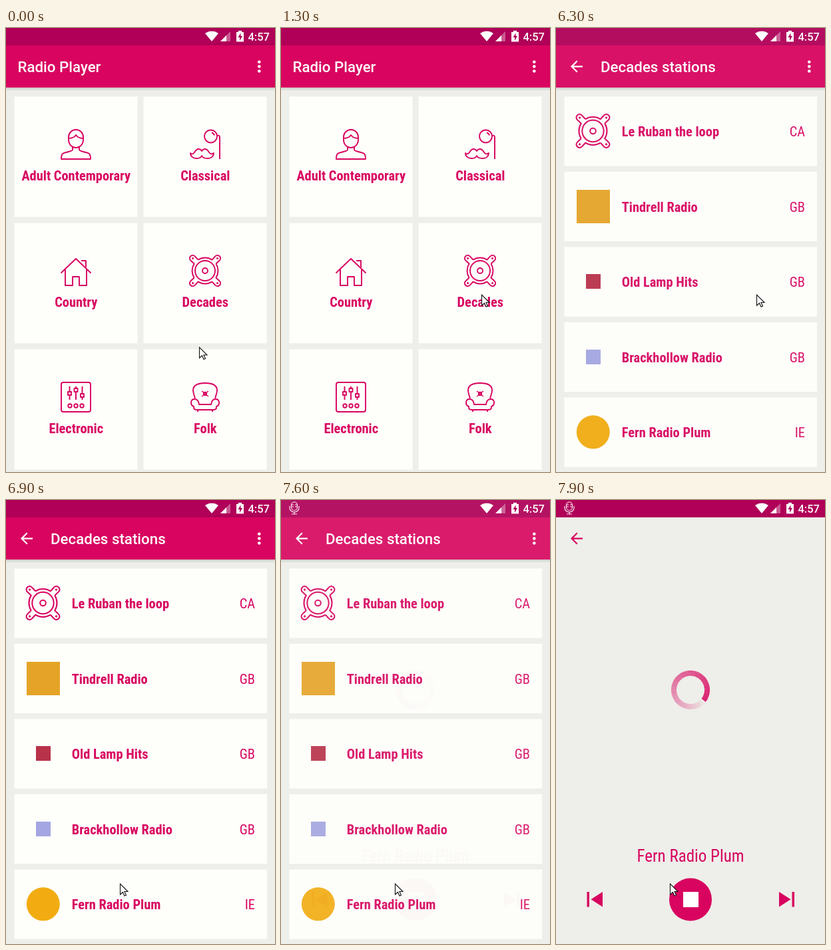
Recreate the animation shown at these times as an HTML page. Size 404x664 px, loop 8000 ms.

```html
<!DOCTYPE html>
<html lang="en">
<head>
<meta charset="utf-8">
<title>Radio Player</title>
<style>
  html, body { margin: 0; width: 100%; height: 100%; overflow: hidden; background: #eeeeea; }
  svg { display: block; width: 404px; height: 664px; font-family: "Roboto Condensed", Roboto, sans-serif; font-stretch: 75%; }
  .card { fill: #fefefb; }
  .line { fill: none; stroke: #d8045f; stroke-width: 1.9; stroke-linejoin: round; }
  .label { font-size: 20.4px; font-weight: 700; fill: #d8045f; }
  .code { font-size: 20.4px; font-weight: 400; fill: #d8045f; }
  .station { font-size: 25px; fill: #d8045f; }
  .title { font-family: Roboto, sans-serif; font-stretch: 100%; font-size: 22.3px; font-weight: 500; fill: #fff; }
  .clock { font-family: Roboto, sans-serif; font-stretch: 100%; font-size: 16.5px; font-weight: 500; fill: #fff; }
</style>
</head>
<body>
<svg id="stage" viewBox="0 0 404 664">
  <defs>
    <linearGradient id="shade" x2="0" y2="1">
      <stop stop-color="#000" stop-opacity=".15"/>
      <stop offset="1" stop-color="#000" stop-opacity="0"/>
    </linearGradient>
    <rect id="strip" width="404" height="26" fill="#b00058"/>
    <g id="bar">
      <rect y="89" width="404" height="5" fill="url(#shade)"/>
      <rect y="26" width="404" height="63" fill="#d8045f"/>
      <use href="#strip"/>
      <g fill="#fff"><circle cx="380.3" cy="50.700" r="2.300"/><circle cx="380.3" cy="57.600" r="2.300"/><circle cx="380.3" cy="64.500" r="2.300"/></g>
    </g>
    <path id="back" d="M20 11H7.830l5.590-5.590L12 4l-8 8 8 8 1.410-1.410L7.830 13H20z" transform="translate(17.500 44) scale(1.125)"/>
    <g id="person" class="line">
      <path d="M-11-11a11 11 0 0 1 22 0v4c0 7-5 12-11 12s-11-5-11-12zM-11-9c5 0 9-2 11-5 2 3 6 5 11 5"/>
      <path d="M-5 4v4c0 3-11 3-15 6-2 2-2 5-2 8h44c0-3 0-6-2-8-4-3-15-3-15-6V4"/>
    </g>
    <g id="monocle" class="line">
      <circle cx="8.500" cy="-12" r="9.500"/>
      <path d="M10-17.500c2 .5 3.500 2 4 4M18-13c2-1 4 0 4 2v33"/>
      <path d="M-22 13c0 5 4 8 9 8 4 0 7-1 8-4 1 3 5 4 9 4 5 0 9-3 9-8-2 2-5 2-7-1-2-3-3-5-6-5-2 0-4 1-5 3-1-2-3-3-5-3-3 0-4 2-6 5-2 3-5 3-6 1z"/>
    </g>
    <g id="house" class="line">
      <path d="M-22.500 3.500 0-18 22.500 3.500M-16-2v24h11V9H5v13h11V-2M8-15h7v10"/>
    </g>
    <g id="speaker" class="line">
      <circle r="15"/><circle r="4"/>
      <path id="edge" d="M-10.500-16.400A19.500 19.500 0 0 1 10.500-16.400L15-21.300A4.500 4.500 0 1 1 21.300-15L16.400-10.500"/>
      <use href="#edge" transform="rotate(90)"/><use href="#edge" transform="rotate(180)"/><use href="#edge" transform="rotate(270)"/>
      <path d="M-18.500-18.500h.1m36.900 0h.1m0 37h-.1m-36.900 0h-.1" stroke-width="3" stroke-linecap="round"/>
    </g>
    <g id="mixer" class="line">
      <rect x="-22" y="-22" width="44" height="44" rx="3"/>
      <path d="M-9.500-16v8m0 5v7M0-16v3m0 5V4M9.500-16v11m0 5v4M-12-8h5v5h-5zM-2.500-13h5v5h-5zM7-5h5v5H7z"/>
      <circle cx="-9" cy="13" r="2.700"/><circle cy="13" r="2.700"/><circle cx="9" cy="13" r="2.700"/>
    </g>
    <g id="chair" class="line">
      <path d="M-15 2c-1-4-3-8-3-12 0-8 6-11 18-11s18 3 18 11c0 4-2 8-3 12"/>
      <path d="M-12 19h24c5 0 5-2 5-5 6-2 5-11-1-11-5 0-6 3-7 8H-9c-1-5-2-8-7-8-6 0-7 9-1 11 0 3 0 5 5 5zM-11 19v3m22-3v3"/>
      <path d="M-5-9 0-5.500l5-3.500M-5-1 0-4.500 5-1" stroke-width="1.500"/><circle cy="-5" r="2.200"/>
    </g>
  </defs>
  <g id="home"></g>
  <g id="list"></g>
  <g id="player"></g>
  <g id="status">
    <path d="M299 8c6-4.500 14-4.500 20 0l-10 12z" fill="#fff"/>
    <path d="M337 5v15h-15z" fill="#fff" opacity=".35"/>
    <path d="M331 11v9h-9z" fill="#fff"/>
    <path d="M346 6h3V4h5v2h3v14.500h-11z" fill="#fff"/>
    <path d="M352.500 7.500 348.500 14h2.500v5l4-7h-2.500z" fill="#b00058"/>
    <text class="clock" x="396" y="18.800" text-anchor="end">4:57</text>
    <g id="mic" fill="none" stroke="#fff" stroke-width="1.200">
      <rect x="15.500" y="3" width="9" height="12.500" rx="4.500"/>
      <path d="M13 9v3a7 6 0 0 0 14 0V9M20 18v2.500M16 21h8M16 7h3m2 0h3M16 10h3m2 0h3"/>
    </g>
  </g>
  <path id="cursor" d="M.5.500v16l4-3.500 2.500 5.500 2.500-1L7 12h5z" fill="#fff" stroke="#111" stroke-width="1.100"/>
</svg>
<script>
const LOOP = 8000, STEP = 100, PINK = '#d8045f';
const $ = id => document.getElementById(id);
const range = (n, f) => Array.from({ length: n }, (_, i) => f(i)).join('');
const box = (x, y, w, h, extra) => `<rect x="${x}" y="${y}" width="${w}" height="${h}" ${extra}/>`;
const text = (cls, x, y, s, anchor = 'start') =>
  `<text class="${cls}" x="${x}" y="${y}" text-anchor="${anchor}">${s}</text>`;
const paper = box(0, 0, 404, 664, 'fill="#eeeeea"');

const genres = [
  ['person', 'Adult Contemporary'], ['monocle', 'Classical'],
  ['house', 'Country'], ['speaker', 'Decades'],
  ['mixer', 'Electronic'], ['chair', 'Folk']
];
const stations = [
  ['Le Ruban the loop', 'CA', '<use href="#speaker" transform="translate(55.500 154) scale(1.080)"/>'],
  ['Tindrell Radio', 'GB', box(31, 242, 50, 50, 'fill="#e5a427"')],
  ['Old Lamp Hits', 'GB', box(45, 368, 22, 22, 'fill="#b8324a"')],
  ['Brackhollow Radio', 'GB', box(45, 481, 22, 22, 'fill="#a3a6e2"')],
  ['Fern Radio Plum', 'IE', '<circle cx="55.800" cy="604.300" r="25" fill="#f2ac12"/>']
];

$('home').innerHTML = paper + genres.map(([icon, name], i) => {
  const x = i % 2 * 194, y = (i >> 1) * 189;
  return box(12.5 + x, 102.5 + y, 185, 180, `class="card" id="genre${i}"`) +
    `<use href="#${icon}" x="${105 + x}" y="${174 + y}"/>` +
    text('label', 105.3 + x, 227.5 + y, name, 'middle');
}).join('') + '<use href="#bar"/>' + text('title', 17.5, 65.6, 'Radio Player');

$('list').innerHTML = paper + '<g id="listBody">' + stations.map(([name, code, art], i) => {
  const y = i * 112.5;
  return box(12.5, 102.5 + y, 379.5, 104, `class="card" id="row${i}"`) + art +
    text('label', 98.7, 162 + y, name) + text('code', 374, 162 + y, code, 'end');
}).join('') + '<use href="#bar"/><use href="#back" fill="#fff"/>' +
  text('title', 67, 65.6, 'Decades stations') + '</g>';

// Ring of short arcs, fading towards the tail
const polar = a => `${25 * Math.cos(a)} ${25 * Math.sin(a)}`;
const ring = range(60, i => {
  const a = i * Math.PI / 30;
  return `<path d="M${polar(a)}A25 25 0 0 1 ${polar(a + .107)}" opacity="${.9 * (i / 59) ** .75}"/>`;
});
$('player').innerHTML = paper + `<g id="playerBody"><use href="#strip"/><use href="#back" fill="${PINK}"/>
  <g id="spinner" fill="none" stroke="${PINK}" stroke-width="8">${ring}</g>
  ${text('station', 202, 541, stations[4][0], 'middle')}
  <path d="M46.500 586h3.500v22.500h-3.500zM70 586v22.500L52.500 597.200zM335 586v22.500l17.500-11.300zM354.500 586h3.500v22.500h-3.500z" fill="${PINK}"/>
  <circle cx="202" cy="597.500" r="32" fill="${PINK}"/>${box(191, 586, 23, 23, 'fill="#fff"')}</g>`;

// Tracks: [time, value] pairs, linear between
const tracks = {
  x: [[0, 290], [500, 301], [6300, 301], [6900, 171]],
  y: [[0, 477], [500, 398.5], [6300, 398.5], [6900, 573.5]],
  genrePress: [[700, 0], [800, .6], [900, 1], [1000, 0]],
  rowPress: [[6900, 0], [7200, 1], [7400, 1], [7500, .5], [7600, 0]],
  list: [[6000, 0], [6100, .26], [6200, .75], [6300, 1]],
  listBody: [[6100, .5], [6200, .78], [6300, .94], [6500, 1]],
  player: [[7500, 0], [7600, .1], [7700, .5], [7800, .94], [7900, 1]],
  playerBody: [[7600, .2], [7700, .65], [7800, .93], [7900, 1]]
};
function at(name, t) {
  const keys = tracks[name], n = keys.findIndex(k => k[0] > t);
  if (n < 0) return keys[keys.length - 1][1];
  if (n === 0) return keys[0][1];
  const [t0, a] = keys[n - 1], [t1, b] = keys[n];
  return a + (b - a) * (t - t0) / (t1 - t0);
}
const fade = (id, v) => $(id).setAttribute('opacity', v);
const move = (id, v) => $(id).setAttribute('transform', v);

function draw(t) {
  for (const id of ['list', 'listBody', 'player', 'playerBody']) fade(id, at(id, t));
  fade('genre3', 1 - at('genrePress', t));
  fade('row4', 1 - at('rowPress', t));
  fade('mic', t >= 7600 ? .9 : 0);
  move('cursor', `translate(${at('x', t)} ${at('y', t)})`);
  move('spinner', `translate(202 284) rotate(${38 + (t - 7900) * .36})`);
}

const start = performance.now();
function tick() {
  const t = (performance.now() - start) % LOOP;
  draw(Math.floor(t / STEP) * STEP);
  requestAnimationFrame(tick);
}
draw(0);
requestAnimationFrame(tick);
</script>
</body>
</html>
```
